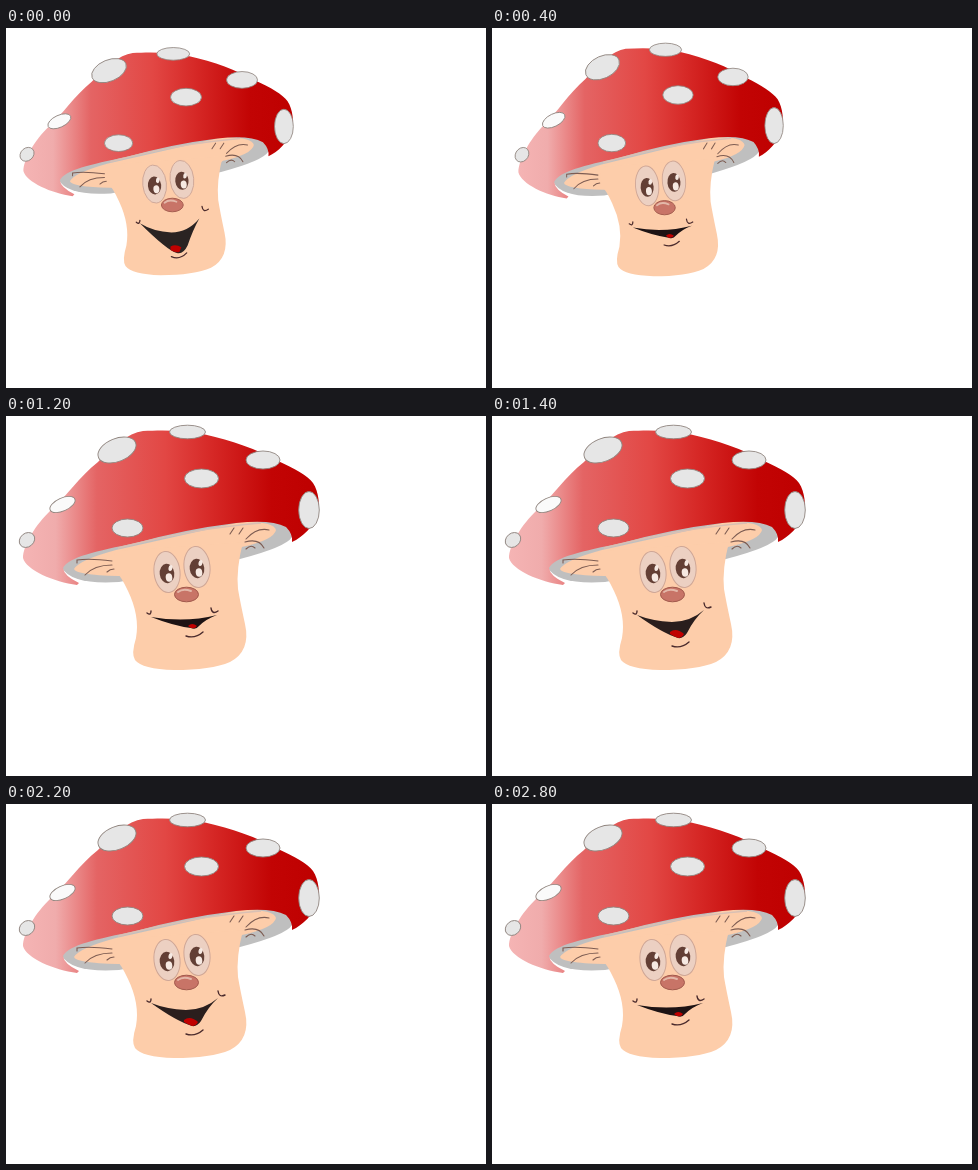
An HTML page that plays this animation: 480 px wide and 360 px high, repeating every 3000 ms.

```html
<!DOCTYPE html>
<html lang="en">
<head>
<meta charset="utf-8">
<title>Talking mushroom</title>
<style>
  html, body { margin: 0; width: 100%; height: 100%; overflow: hidden; background: #fff; }
  svg { display: block; width: 480px; height: 360px; }
  .line { fill: none; stroke: #7d5c52; stroke-width: 1.1; stroke-linecap: round; }
  .mark { fill: none; stroke: #4a2a2c; stroke-width: 1.4; stroke-linecap: round; }
  .eye { fill: #ecd0c2; stroke: #cfa797; }
  .iris { fill: #633f35; }
  .shine { fill: #f6e9e2; }
  .spots { fill: #e6e6e6; stroke: #90857f; stroke-width: .9; }
</style>
</head>
<body>
<svg viewBox="0 0 480 360">
  <defs>
    <linearGradient id="red" gradientUnits="userSpaceOnUse" x1="17" x2="313" y1="0" y2="0">
      <stop offset="0" stop-color="#f5b4b4"/>
      <stop offset=".11" stop-color="#f0acac"/>
      <stop offset=".25" stop-color="#e46464"/>
      <stop offset=".48" stop-color="#e24744"/>
      <stop offset=".64" stop-color="#d62826"/>
      <stop offset=".84" stop-color="#c20404"/>
      <stop offset="1" stop-color="#be0000"/>
    </linearGradient>
  </defs>

  <g class="upper">
    <path fill="#bfbfbf" d="M56 152L62 132L250 96L284 110L286 121Q280 131 234 143L113 166Q66 169 56 152Z"/>
    <path fill="#fdcdaa" d="M68 153Q73 144 110 134L235 106Q268 105 270 114Q268 124 236 131L200 160H112Q70 159 68 153Z"/>
  </g>

  <g class="lower">
    <path fill="#fdcdaa" d="M108 135L237 126Q230 153 232 173Q234 185 239 208Q245 235 224 246Q205 254 168 254Q136 253 129 244Q125 238 130 222Q134 200 122 175Q115 160 110 156Z"/>
  </g>

  <g class="upper">
    <path fill="url(#red)" d="M17 142C17 130 29 109 45 94C60 81 73 61 92 46C106 31 122 17 137 15C155 14 178 14 197 18C228 25 250 33 272 45C288 52 302 60 307 67C313 76 314 90 312 98C307 111 297 121 286 126Q287 118 280 111Q265 103 230 107Q180 113 130 127C90 135 63 141 57 152Q58 160 73 167L71 169C48 166 20 154 17 142Z"/>
    <path fill="none" stroke="#d9c0b4" stroke-width="1.6" d="M112 132Q190 112 255 107"/>
    <g class="spots" id="spots"></g>
    <g class="line">
      <path d="M106 145Q84 142 71 144V147M79 159Q88 149 106 149M101 156Q104 153 108 153"/>
      <path d="M224 118L228 112M233 118L237 112M240 123Q251 111 263 114M239 126Q253 122 258 132M240 133Q245 128 249 132"/>
    </g>
    <g id="eyes"></g>
    <ellipse cx="180.5" cy="178.5" rx="12" ry="7.3" fill="#c87467" stroke="#a1594c"/>
    <path d="M172 176Q177 172 185 175" fill="none" stroke="#e3b8a9" stroke-width="2" stroke-linecap="round"/>
  </g>

  <g class="lower">
    <path class="mark" d="M141 197Q145 200 145 195"/>
    <g class="mouth">
      <path fill="#2a2322" d="M145 198Q160 207 180 208Q198 208 211 193Q204 205 198 222Q193 232 186 230Q175 227 145 198Z"/>
      <path fill="#c00000" d="M179 223Q185 220 191 224L189 229Q183 230 179 227Z"/>
      <path class="mark" d="M214 180Q215 187 221 183M180 234Q189 238 197 230"/>
    </g>
    <g class="mouth">
      <path fill="#2a1e1d" d="M145 199Q160 205 180 206Q198 206 212 194Q202 203 195 217Q191 223 186 222Q170 217 145 199Z"/>
      <path fill="#c00000" d="M178 216Q184 211 192 218Q190 222 186 222Q181 220 178 218Z"/>
      <path class="mark" d="M212 187Q213 194 219 191M180 230Q189 233 197 226"/>
    </g>
    <g class="mouth">
      <path fill="#1d1314" d="M145 201Q180 207 211 199Q200 203 193 210Q190 214 185 212Q168 210 145 201Z"/>
      <path fill="#c00000" d="M182 210Q186 206 191 210Q189 213 185 212Z"/>
      <path class="mark" d="M205 192Q206 199 212 195M180 220Q189 223 197 216"/>
    </g>
  </g>
</svg>
<script>
  const ellipse = (cx, cy, rx, ry, angle = 0, attrs = '') =>
    `<ellipse cx="${cx}" cy="${cy}" rx="${rx}" ry="${ry}" transform="rotate(${angle} ${cx} ${cy})" ${attrs}/>`;

  document.getElementById('spots').innerHTML = [
    [111, 34, 20, 11.5, -22], [181.5, 16, 18, 6.8], [257, 44, 17, 9],
    [195.5, 62.5, 17, 9.5], [121.5, 112, 15.5, 9],
    [56.5, 88.5, 13.5, 6.5, -24, 'fill="#fafafa"'],
    [21, 124, 8.3, 6.8, -40], [303, 94, 10.3, 18.5]
  ].map(spot => ellipse(...spot)).join('');

  const eye = (x, y) =>
    ellipse(x, y, 13, 20.5, -6, 'class="eye"') +
    ellipse(x, y + 1.5, 7.3, 9.7, -6, 'class="iris"') +
    ellipse(x + 2, y + 5.5, 3.3, 4.3, -6, 'class="shine"') +
    ellipse(x + 3.5, y - 4, 2, 3, 10, 'class="shine"');
  document.getElementById('eyes').innerHTML = eye(161, 156) + eye(191, 151);

  // Each pose holds matrices for the cap and face, and for the stem and mouth.
  const poses = [
    { upper: 'matrix(.911 0 0 .93 1.9 11)', lower: 'matrix(.9 0 0 .93 3.4 11)' },
    { upper: 'matrix(.894 0 0 .972 11.2 6.2)', lower: 'matrix(.894 0 0 .92 11.2 14.6)' },
    { upper: '', lower: '' }
  ];
  const mouthCycle = [0, 1, 2, 1]; // open, half, nearly closed, half
  const mouths = document.querySelectorAll('.mouth');

  function draw() {
    const step = Math.floor(performance.now() % 3000 / 200);
    const pose = poses[step === 0 ? 0 : step < 3 ? 1 : 2];
    for (const part of ['upper', 'lower'])
      document.querySelectorAll('.' + part).forEach(g => g.setAttribute('transform', pose[part]));
    mouths.forEach((mouth, i) => {
      mouth.style.display = i === mouthCycle[step % 4] ? '' : 'none';
    });
    requestAnimationFrame(draw);
  }
  draw();
</script>
</body>
</html>
```
